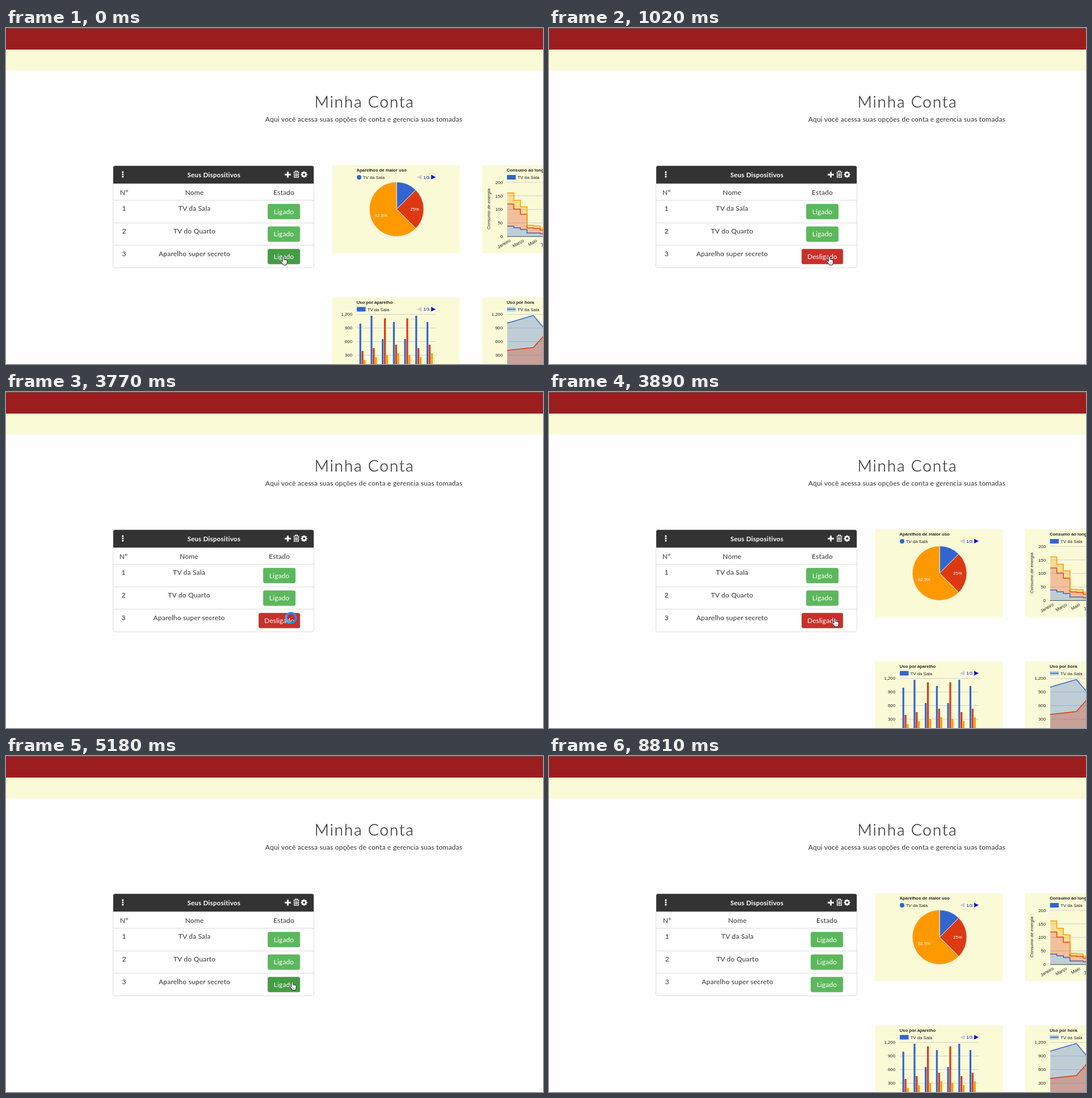
Animation of 946x592 px, one loop 9360 ms. Source, as an HTML page:

```html
<!DOCTYPE html>
<html lang="pt">
<head>
<meta charset="utf-8">
<title>Minha Conta</title>
<style>
html, body { margin: 0; width: 100%; height: 100%; overflow: hidden; background: #fefefe; }
svg { display: block; width: 100%; height: 100%; }
.ui { font: 12px Lato, sans-serif; letter-spacing: .2px; fill: #333; }
.ui .title { font-size: 28px; font-weight: 300; letter-spacing: 1.8px; stroke: #333; stroke-width: .3px; }
.ui .head { font-size: 11.5px; font-weight: 700; letter-spacing: .25px; fill: #fff; }
.ui .btn { letter-spacing: .1px; fill: #fff; }
.chart { font: 7.75px "Liberation Sans", Arial, sans-serif; fill: #222; }
.bold { font-weight: 700; }
</style>
</head>
<body>
<svg id="stage" viewBox="0 0 946 592" xmlns="http://www.w3.org/2000/svg"></svg>
<script>
const LOOP = 9360;
const BLUE = '#3366cc', RED = '#dc3912', ORANGE = '#ff9900', CREAM = '#fafad7';

const rect = (x, y, w, h, fill, extra = '') =>
  `<rect x="${x}" y="${y}" width="${w}" height="${h}" fill="${fill}" ${extra}/>`;
const path = (d, fill, extra = '') => `<path d="${d}" fill="${fill}" ${extra}/>`;
const line = (d, color, w = 1) => path(d, 'none', `stroke="${color}" stroke-width="${w}"`);
const text = (x, y, s, anchor = 'start', extra = '') =>
  `<text x="${x}" y="${y}" text-anchor="${anchor}" ${extra}>${s}</text>`;
const mid = (x, y, s, extra) => text(x, y, s, 'middle', extra);
const button = (x, y, w, label, fill, border) =>
  rect(x + .35, y + .35, w - .7, 26.1, fill, `rx="2.6" stroke="${border}" stroke-width=".7"`) +
  mid(x + w / 2, y + 17.7, label, 'class="btn"');

function header() {
  return rect(0, 0, 946, 592, '#fefefe') +
    rect(0, 0, 946, 38, '#9c1d1d') + rect(0, 0, 946, 1, '#6f5555') +
    rect(0, 37, 946, 1, '#931b1b') + rect(0, 38, 946, 37, CREAM) +
    mid(631.5, 140, 'Minha Conta', 'class="title"') +
    mid(630.4, 164.7, 'Aqui você acessa suas opções de conta e gerencia suas tomadas');
}

function icons() {
  const dots = [254, 258, 262].map(y => rect(204.3, y - 1.4, 2.9, 2.9, '#fff', 'rx=".8"')).join('');
  const plus = path('M494.9 253h3v3.7h3.9v3h-3.9v3.7h-3v-3.7h-3.9v-3h3.9z', '#fff');
  const bin = line('M506.3 254h10.4M509.5 253.6v-1.5h4v1.5M507.6 254.5v8.6h7.8v-8.6' +
    'M509.7 256v5.6M511.5 256v5.6M513.3 256v5.6', '#fff', 1.1);
  const teeth = [0, 45, 90, 135].map(a =>
    rect(523.8, 252.6, 2.6, 11, '#fff', `transform="rotate(${a} 525.1 258.1)"`)).join('');
  const gear = teeth + '<circle cx="525.1" cy="258.1" r="3" fill="#333" stroke="#fff" stroke-width="2.4"/>' +
    '<circle cx="525.1" cy="258.1" r="1.8" fill="#333"/>';
  return dots + plus + bin + gear;
}

function panel() {
  const rows = [318, 358, 397.5];
  const names = ['TV da Sala', 'TV do Quarto', 'Aparelho super secreto'];
  const column = (x, title, cells) =>
    mid(x, 293.5, title) + rows.map((y, i) => mid(x, y + 4, cells[i])).join('');
  const cols = [
    column(208, 'Nº', [1, 2, 3]),
    column(332, 'Nome', names),
    mid(489.5, 293.5, 'Estado') +
      [310, 349.7].map(y => button(461, y, 57, 'Ligado', '#5cb85c', '#4cae4c')).join('')
  ];
  return rect(188.5, 242.5, 354, 180, '#fff', 'rx="3.5" stroke="#ddd"') +
    path('M189 274V246q0-3 3-3H539q3 0 3 3V274z', '#333') +
    line('M189 274.5H542M189 303.5H542M189 343.5H542M189 382.5H542', '#ddd') +
    mid(366.2, 262.5, 'Seus Dispositivos', 'class="head"') +
    icons() + cols.map((c, i) => `<g id="col${i}">${c}</g>`).join('') + '<g id="third"></g>';
}

const pager = y =>
  path(`M732 ${y - 4}v8l-8-4z`, '#ccc') + path(`M749 ${y - 4}v8l8-4z`, '#0011cc') +
  text(735.3, y + 2.8, '1/3', 'start', 'fill="#0011cc"');
const frame = (x, y, title) =>
  rect(x, y, 225, 155, CREAM) + text(x + 43, y + 11, title, 'start', 'class="bold"');
const legend = (x, y) => text(x, y, 'TV da Sala');
const grid = (x, w, y0, gap, labels) => labels.map((s, i) => {
  const y = y0 + i * gap;
  return line(`M${x} ${y}h${w}`, s === '0' ? '#333' : '#ccc', .9) + text(x - 8, y + 2.7, s, 'end');
}).join('');

function pie() {
  const at = f => {
    const a = f * 2 * Math.PI;
    return `${688 + 48 * Math.sin(a)} ${319.3 - 48 * Math.cos(a)}`;
  };
  const slice = (a, b, c) => path(
    `M688 319.3L${at(a)}A48 48 0 ${b - a > .5 ? 1 : 0} 1 ${at(b)}Z`, c, 'stroke="#fff" stroke-width=".8"');
  return frame(574.5, 242, 'Aparelhos de maior uso') +
    `<circle cx="622" cy="263" r="4" fill="${BLUE}"/>` + legend(628.7, 265.5) + pager(262.8) +
    slice(0, .125, BLUE) + slice(.125, .375, RED) + slice(.375, 1, ORANGE) +
    mid(720, 322, '25%', 'fill="#fff"') + mid(661, 333, '62.5%', 'fill="#fff"');
}

function steps() {
  const tops = [
    [349, 352, 355, 361.3, 361.3, 362.5],
    [310, 319, 328, 352.3, 353, 356],
    [290.5, 303.5, 315, 347.5, 348.5, 352.5]
  ];
  const x = i => 883 + i * 11.6;
  const edge = a => a.map((y, i) => `L${x(i)} ${y}H${x(i + 1)}`).join('');
  const back = a => a.map((y, i) => `L${x(i + 1)} ${y}H${x(i)}`).reverse().join('');
  const areas = tops.map((a, i) => {
    const color = [BLUE, RED, ORANGE][i];
    const floor = i ? back(tops[i - 1]) : 'V367.5H883';
    return path('M' + edge(a).slice(1) + floor + 'Z', color, 'fill-opacity=".3"') +
      line('M' + edge(a).slice(1), color, 1.5);
  }).join('');
  const months = ['Janeiro', 'Março', 'Maio', 'Julho'].map((m, i) => {
    const mx = 889.5 + i * 23.4;
    return text(mx, 376, m, 'end', `transform="rotate(-30 ${mx} 376)"`);
  }).join('');
  return frame(839, 242, 'Consumo ao longo do ano') + rect(882.5, 259, 15.5, 8, BLUE) +
    legend(901.3, 265.5) + grid(883, 63, 272, 23.85, ['200', '150', '100', '50', '0']) + areas +
    mid(853, 319, 'Consumo de energia', 'font-style="italic" transform="rotate(-90 853 319)"') + months;
}

const BIG = ['1,200', '900', '600', '300'];

function bars() {
  const tops = [
    [521, 507, 548, 518, 548, 507, 518],
    [569, 564, 511.5, 558, 511.5, 564, 558],
    [585, 580, 576, 573, 576, 580, 573]
  ];
  return frame(574.5, 475, 'Uso por aparelho') + rect(618, 491.5, 15.5, 8, BLUE) +
    legend(636.7, 498.5) + pager(495.5) + grid(618, 139, 504.7, 23.9, BIG) +
    tops.map((set, k) => set.map((y, i) =>
      rect(622.6 + i * 19.7 + k * 3.9, y, 3.2, 600 - y, [BLUE, RED, ORANGE][k])).join('')).join('');
}

function hours() {
  const area = (d, color) => path(d + 'V600H883Z', color, 'fill-opacity=".3"') + line(d, color, 1.5);
  return frame(839, 475, 'Uso por hora') +
    rect(882.5, 491.5, 15.5, 8, BLUE, 'fill-opacity=".3"') + rect(882.5, 494.7, 15.5, 1.6, BLUE) +
    legend(901.3, 498.5) + grid(883, 63, 504.7, 23.9, BIG) +
    area('M883 520L929 506.5L975 561', BLUE) + area('M883 568L929 563L975 511', RED);
}

// Cursor shapes, each drawn around its own anchor
const pointers = {
  hand: path('M4 1.6a1.4 1.4 0 0 1 2.8 0V6.2q1.6-.8 2.1.4 1.5-.6 1.9.5 1.4-.2 1.4 1.3' +
    'V11.5q0 1.5-1.2 2.6V15.5H5V14.2Q2.6 12 .7 9.2C0 7.800 1.6 7.1 2.6 8.2L4 9.5Z',
    '#fff', 'stroke="#111" stroke-width=".9"') +
    line('M7 11v2.5M9 11v2.5', '#444', .6),
  arrow: path('M0 0V12L2.8 9.4 4.8 14 6.8 13.1 4.9 8.7H8.7Z', '#fff',
    'stroke="#111" stroke-width=".9"'),
  busy: '<circle r="8.8" fill="none" stroke="#2590ec" stroke-width="3.6"/>' +
    line('M-2 8.57A8.8 8.8 0 0 1-7.6-4.4', '#3bb4f5', 3.4)
};

const track = [
  [0, 'hand', 483, 402], [890, 'hand', 485, 402], [1020, 'hand', 488.5, 402],
  [1160, 'hand', 491, 402], [1310, 'hand', 494, 402], [1430, 'hand', 498, 401],
  [1580, 'hand', 504, 396], [1700, 'hand', 509, 387], [1830, 'hand', 513, 378],
  [1950, 'hand', 514, 375], [2070, 'hand', 513, 377], [2220, 'hand', 506, 386],
  [2340, 'hand', 497, 395], [2490, 'hand', 496, 398], [3770, 'busy', 502, 398],
  [3890, 'hand', 498, 398], [4760, 'arrow', 504.5, 396.5], [4900, 'arrow', 507, 397],
  [5180, 'hand', 499, 397], [7990, 'busy', 506.5, 396.8], [8290, 'arrow', 590, 425],
  [8410, 'arrow', 672.5, 469], [8560, 'arrow', 785, 527], [8680, 'arrow', 867.5, 570],
  [8810, null, 0, 0]
];

const $ = id => document.getElementById(id);
const within = (t, a, b) => t >= a && t < b;

$('stage').innerHTML = `<g class="ui">${header()}${panel()}</g>` +
  `<g id="charts" class="chart">${pie()}${steps()}${bars()}${hours()}</g>` +
  '<g id="cursor"></g>';

function thirdButton(t) {
  const off = within(t, 890, 5180);
  const pressed = within(t, 150, 470) || within(t, 4450, 4760);
  const focus = within(t, 150, 890) || within(t, 4450, 5180);
  const x = off ? 445 : 461, w = off ? 73 : 57;
  const [fill, border] = off
    ? (pressed ? ['#ac2925', '#8b211e'] : ['#c9302c', '#ac2925'])
    : t >= 8290 ? ['#5cb85c', '#4cae4c']
    : pressed ? ['#398439', '#2d6a2d'] : ['#449d44', '#398439'];
  const ring = focus
    ? rect(x - .5, 389, w + 1, 27.5, 'none', 'stroke="#888" stroke-dasharray="1 1"') : '';
  return button(x, 389.3, w, off ? 'Desligado' : 'Ligado', fill, border) + ring;
}

const shown = {};
function put(id, html) {
  if (shown[id] !== html) $(id).innerHTML = shown[id] = html;
}

function render(t) {
  const off = within(t, 890, 5180);
  [-1, -9.5, -8].forEach((dx, i) =>
    $('col' + i).setAttribute('transform', `translate(${off ? dx : 0} 0)`));
  put('third', thirdButton(t));
  const charts = t < 890 || within(t, 3890, 5180) || t >= 8140;
  $('charts').setAttribute('visibility', charts ? 'visible' : 'hidden');
  const [, kind, x, y] = track.filter(k => k[0] <= t).pop();
  put('cursor', kind ? pointers[kind] : '');
  $('cursor').setAttribute('transform', `translate(${x} ${y})`);
}

const start = performance.now();
function tick() {
  render((performance.now() - start) % LOOP);
  requestAnimationFrame(tick);
}
tick();
</script>
</body>
</html>
```
